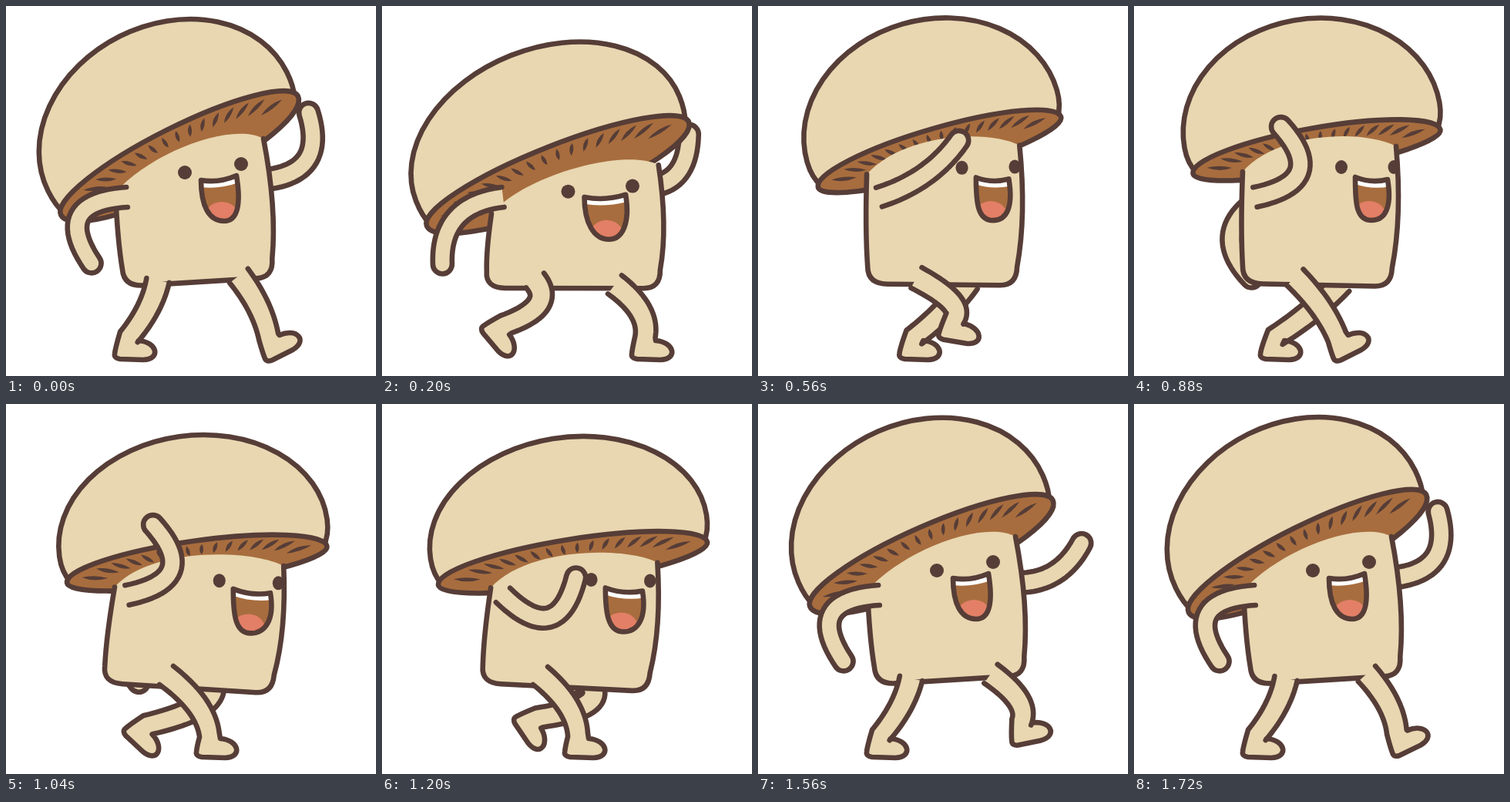
Write an HTML page with a canvas that moves like this. It is 480x480 px and loops after 1.76 s.

```html
<!DOCTYPE html>
<html lang="en">
<head>
<meta charset="utf-8">
<title>Walking mushroom</title>
<style>
html, body { margin: 0; width: 100%; height: 100%; overflow: hidden; background: #fff; }
canvas { display: block; width: 100vw; height: 100vh; }
</style>
</head>
<body>
<canvas id="stage" width="480" height="480"></canvas>
<script>
const ctx = document.getElementById('stage').getContext('2d');
const LOOP = 1760, HALF = LOOP / 2, STEP = 40, TAU = 2 * Math.PI, DEG = Math.PI / 180;
const SKIN = '#e8d7b1', LINE = '#563d37', GILL = '#a86d3e', TONGUE = '#e27f66';

const angleAt = t => TAU * t / LOOP;
const wrap = (t, span) => (t % span + span) % span;
const polar = ([x, y], angle, len) => [x + len * Math.cos(angle), y + len * Math.sin(angle)];

// Eased swing: 1 at the start of the loop, 0 half a loop later.
function swing(t) {
  const s = Math.min(1, Math.max(0, (Math.cos(angleAt(t)) + 0.72) / 1.4));
  return s * s * (3 - 2 * s);
}

// Dip of the weight after each footfall.
function sink(t) {
  const u = wrap(t, HALF) / HALF / 0.53;
  return u < 1 ? Math.sin(Math.PI * u) ** 2 : 0;
}

// turn: how far the body faces the viewer; dip: weight; late: the cap's delayed dip
let turn = 0, dip = 0, late = 0;

// A resting point, shifted by the turn and by the dip.
const at = (x, y, tx, ty, dx, dy) => [x + tx * turn + dx * dip, y + ty * turn + dy * dip];

const toward = ([x0, y0], [x1, y1], d) => polar([x0, y0], Math.atan2(y1 - y0, x1 - x0), d);
const middle = (p, q) => [(p[0] + q[0]) / 2, (p[1] + q[1]) / 2];
const shift = (p, x, y) => [p[0] + x, p[1] + y];
const follow = pts => pts.forEach(p => ctx.lineTo(...p));

function paint(fill) {
  ctx.fillStyle = fill;
  ctx.fill();
  ctx.stroke();
}

// Both sides of a curved limb that runs from root through joint to tip.
function sides(root, joint, tip, w0, w1) {
  const ctrl = joint.map((v, i) => 2 * v - (root[i] + tip[i]) / 2);
  const back = [], front = [], N = 24;
  let dir = 0;
  for (let i = 0; i <= N; i++) {
    const t = i / N, q = 1 - t, w = w0 + (w1 - w0) * t;
    const p = ctrl.map((c, k) => q * q * root[k] + 2 * q * t * c + t * t * tip[k]);
    const d = ctrl.map((c, k) => q * (c - root[k]) + t * (tip[k] - c));
    dir = Math.atan2(d[1], d[0]);
    back.push(polar(p, dir + Math.PI / 2, w));
    front.unshift(polar(p, dir - Math.PI / 2, w));
  }
  return { back, front, dir };
}

function arm(shoulder, angle, bend) {
  const elbow = polar(shoulder, angle * DEG, 66);
  const hand = polar(elbow, (angle + bend) * DEG, 63);
  const { back, front, dir } = sides(shoulder, elbow, hand, 13, 12.5);
  ctx.beginPath();
  follow(back);
  ctx.arc(...hand, 12.5, dir + Math.PI / 2, dir - Math.PI / 2, true);
  follow(front);
  paint(SKIN);
}

// Phase 0 is the heel strike; the foot is in the air for the second half.
function leg(phase, hip, rear, stride) {
  const lift = Math.max(0, -Math.sin(angleAt(phase)));
  const ankle = [rear + stride * swing(phase), 431 - 26 * lift];
  const knee = shift(middle(hip, ankle), 6 + 16 * lift + 8 * dip, 4 * lift);
  const air = Math.sin(1.5 * Math.PI * (phase / HALF - 1));
  const tilt = phase < HALF ? -0.5 * Math.max(0, 1 - phase / 120) : air * (air > 0 ? 0.95 : 0.5);
  const c = Math.cos(tilt), s = Math.sin(tilt);
  const foot = (u, v) => shift(ankle, u * c - v * s, u * s + v * c);
  const { back, front } = sides(hip, knee, ankle, 15, 13);
  ctx.beginPath();
  follow(back);
  ctx.quadraticCurveTo(...foot(-16, 12), ...foot(-17, 20));
  ctx.quadraticCurveTo(...foot(-18, 26), ...foot(-10, 27));
  ctx.lineTo(...foot(20, 28));
  ctx.bezierCurveTo(...foot(44, 27), ...foot(38, 5), ...foot(14, 3));
  follow(front.slice(1));
  paint(SKIN);
}

function gillMark(x0, y0, x1, y1) {
  const [mx, my] = middle([x0, y0], [x1, y1]);
  const len = Math.hypot(x1 - x0, y1 - y0);
  const nx = -(y1 - y0) / len * 6, ny = (x1 - x0) / len * 6;
  ctx.beginPath();
  ctx.moveTo(x0, y0);
  ctx.quadraticCurveTo(mx + nx, my + ny, x1, y1);
  ctx.quadraticCurveTo(mx - nx * 0.7, my - ny * 0.7, x0, y0);
  ctx.fill();
}

function cap(t) {
  const phi = angleAt(t), base = -35;
  const r = 163 + 9 * turn + 14 * late, a = r + 5 - 4 * turn;
  const above = 31 + 6 * turn, below = 25 + 16 * turn;
  ctx.save();
  ctx.translate(...at(237, 189, -12, 5, 9 * (1 - Math.sin(phi)), 25));
  ctx.rotate((-18.3 - 8.4 * Math.cos(phi - 0.17) + 5 * late) * DEG);

  ctx.beginPath();
  ctx.ellipse(0, base, a, 138 - 10 * late, 0, Math.PI, TAU);
  ctx.quadraticCurveTo(a, -14, r - 5, 0);
  ctx.lineTo(5 - r, 0);
  ctx.quadraticCurveTo(-a, -14, -a, base);
  ctx.closePath();
  paint(SKIN);

  ctx.beginPath();
  ctx.ellipse(0, 0, r, above, 0, Math.PI, TAU);
  ctx.ellipse(0, 0, r, below, 0, 0, Math.PI);
  ctx.closePath();
  paint(GILL);

  ctx.fillStyle = LINE;
  for (let i = 0; i < 16; i++) {
    const x = (i / 7.5 - 1) * 0.98, y = above * Math.sqrt(1 - x * x);
    gillMark(0.9 * r * x, 1 - 0.86 * y, 0.7 * r * x, 5 - 0.56 * y);
  }
  ctx.restore();
}

function body() {
  const a = at(141, 215, 1, 27, 0, 29), b = at(141, 360, 12, 4, -20, 2);
  const c = at(334, 364, 13, -12, 15, 15), d = at(340, 182, -6, -10, 26, 36);
  const outline = () => {
    ctx.beginPath();
    ctx.moveTo(...a);
    ctx.quadraticCurveTo(...shift(middle(a, b), -3, 0), ...toward(b, a, 22));
    ctx.quadraticCurveTo(...b, ...toward(b, c, 26));
    ctx.lineTo(...toward(c, b, 22));
    ctx.quadraticCurveTo(...c, ...toward(c, d, 24));
    ctx.quadraticCurveTo(...shift(middle(c, d), 11, 0), ...d);
  };
  outline();
  ctx.bezierCurveTo(...shift(d, -42, -22), ...shift(a, 46, -52), ...a);
  ctx.fillStyle = SKIN;
  ctx.fill();
  outline();
  ctx.stroke();
}

function oval(p, rx, ry, fill) {
  ctx.beginPath();
  ctx.ellipse(...p, rx, ry, 0, 0, TAU);
  ctx.fillStyle = fill;
  ctx.fill();
}

function mouth() {
  const l = at(287, 222, -34, 4, 10, 23), r = at(329, 225, -30, -5, 18, 26);
  const b = at(308, 278, -25, 1, 12, 25), m = middle(l, r);
  const shape = () => {
    ctx.beginPath();
    ctx.moveTo(...l);
    ctx.bezierCurveTo(...shift(l, 0, 33), ...shift(b, -20, 0), ...b);
    ctx.bezierCurveTo(...shift(b, 18, 0), ...shift(r, 6, 36), ...r);
    ctx.quadraticCurveTo(...shift(m, 0, 7), ...l);
    ctx.closePath();
  };
  ctx.save();
  shape();
  ctx.clip();
  ctx.fillStyle = GILL;
  ctx.fill();
  oval(shift(b, -3, -5), 22, 20, TONGUE);
  ctx.beginPath();
  ctx.moveTo(...shift(l, 0, -4));
  ctx.lineTo(...shift(l, 0, 9));
  ctx.quadraticCurveTo(...shift(m, 0, 15), ...shift(r, 3, 9));
  ctx.lineTo(...shift(r, 3, -4));
  ctx.fillStyle = '#fff';
  ctx.fill();
  ctx.restore();
  shape();
  ctx.stroke();
}

function draw(t) {
  const cos = Math.cos(angleAt(t)), sin = Math.sin(angleAt(t));
  turn = swing(t);
  dip = sink(t);
  late = sink(t - STEP);

  ctx.fillStyle = '#fff';
  ctx.fillRect(0, 0, 480, 480);
  ctx.strokeStyle = LINE;
  ctx.lineWidth = 6.6;
  ctx.lineCap = ctx.lineJoin = 'round';

  const farLeg = () => leg(t, at(268, 360, 34, -10, 0, 12), 181, 160);
  const facing = turn > 0.4;

  // Each arm straightens as it swings past the hip.
  arm([250 + 78 * cos, 236 - 10 * cos], 55 - 77 * cos, -65 + 55 * Math.max(0, -sin) ** 2);
  if (!facing) farLeg();
  cap(t);
  body();
  oval(at(269, 209, -37, 7, 10, 26), 8 + turn, 9, LINE);
  oval(at(337, 209, -32, -4, 21, 30), 7.5 + 1.5 * turn, 9, LINE);
  mouth();
  if (facing) farLeg();
  leg(wrap(t + HALF, LOOP), [203 - 6 * cos, 352 + 4 * turn], 158, 106);
  arm([157, 248], -30 + 188 * swing(t + 60), -82 + 76 * Math.max(0, sin) ** 2);
}

const start = performance.now();
function tick() {
  const t = (performance.now() - start) % LOOP;
  draw(Math.floor(t / STEP) * STEP);
  requestAnimationFrame(tick);
}
tick();
</script>
</body>
</html>
```
